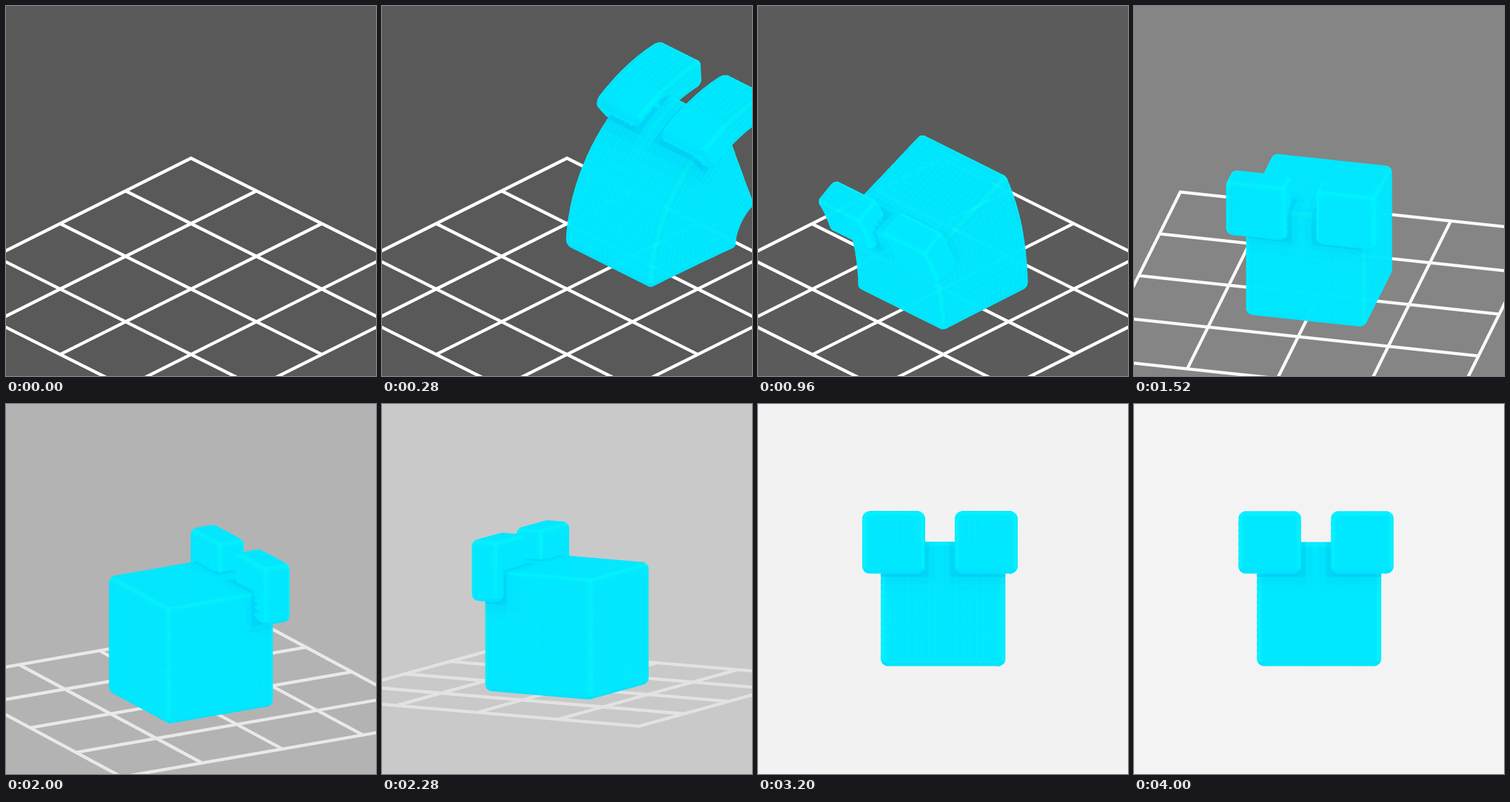
Animation, 540 px wide and 540 px high, one loop 4200 ms. Source, as an HTML page with a canvas:

```html
<!DOCTYPE html>
<html lang="en">
<head>
<meta charset="utf-8">
<title>Cube character turntable</title>
<style>
  html, body { margin: 0; height: 100%; overflow: hidden; background: #595959; }
  canvas { display: block; }
</style>
</head>
<body>
<canvas width="540" height="540"></canvas>
<script>
const ctx = document.querySelector('canvas').getContext('2d');
const LOOP = 4200, CELL = 135, BODY = 180, RADIUS = 10;

// Axes: lateral, forward (where the eyes look), up.
const body = { center: [0, 0, 90], half: [90, 90, 90] };
const eyes = [-72, 63].map(x => ({ center: [x, 80, 180], half: [45, 22.5, 45] }));

const clamp = (v, lo, hi) => Math.min(hi, Math.max(lo, v));
const mix = (a, b, k) => a + (b - a) * k;
const progress = (t, from, to) => clamp((t - from) / (to - from), 0, 1);
const sineInOut = u => (1 - Math.cos(Math.PI * u)) / 2;
const cubicInOut = u => u < .5 ? 4 * u ** 3 : 1 - 4 * (1 - u) ** 3;

// Grid positions along one side, denser inside the rounded edges.
function ticks(half) {
  const flat = half - RADIUS, steps = Math.round(flat / 5);
  const edge = [1, .7, .45, .2].map(k => flat + k * RADIUS);
  const inner = Array.from({ length: steps + 1 }, (_, i) => mix(-flat, flat, i / steps));
  return [...edge.map(v => -v), ...inner, ...edge.reverse()];
}

function roundPoint(p, { center, half }) {
  const core = p.map((v, i) => clamp(v, RADIUS - half[i], half[i] - RADIUS));
  const d = p.map((v, i) => v - core[i]), len = Math.hypot(...d);
  const normal = d.map(v => v / len);
  return { normal, pos: core.map((v, i) => center[i] + v + normal[i] * RADIUS) };
}

const boxDistance = (p, { center, half }) =>
  Math.hypot(...p.map((v, i) => Math.max(Math.abs(v - center[i]) - half[i], 0)));

function surfaceColor({ pos, normal }, occluders) {
  const bevel = 1 - Math.max(...normal.map(Math.abs));
  const near = Math.min(...occluders.map(box => boxDistance(pos, box)));
  const shade = 24 * Math.exp(-near / 9);
  const green = 232 + bevel * (normal[2] < -.3 ? -25 : 40) - shade;
  return `rgb(0,${Math.round(green)},${Math.round(255 - shade * .4)})`;
}

function roundedBox(box, occluders) {
  const quads = [];
  for (let a = 0; a < 3; a++) for (const side of [-1, 1]) {
    const u = (a + 1) % 3, v = (a + 2) % 3;
    const us = ticks(box.half[u]), vs = ticks(box.half[v]);
    const at = (x, y) => {
      const p = [];
      p[a] = side * box.half[a]; p[u] = x; p[v] = y;
      return roundPoint(p, box);
    };
    for (let i = 1; i < us.length; i++) for (let j = 1; j < vs.length; j++) {
      const [x0, x1, y0, y1] = [us[i - 1], us[i], vs[j - 1], vs[j]];
      const points = [at(x0, y0), at(x1, y0), at(x1, y1), at(x0, y1)].map(c => c.pos);
      if (side < 0) points.reverse();
      quads.push({ points, color: surfaceColor(at((x0 + x1) / 2, (y0 + y1) / 2), occluders) });
    }
  }
  return quads;
}

const quads = [...roundedBox(body, eyes), ...eyes.flatMap(eye => roundedBox(eye, []))];

// Total bend angle of the body; negative leans backwards.
function leanAt(t) {
  if (t < 1000) return mix(-1.22, .45, sineInOut(progress(t, 360, 1000)));
  return mix(.45, 0, sineInOut(progress(t, 1000, 1440)));
}

function bend([l, f, z], lean) {
  if (Math.abs(lean) < 1e-4) return [l, f, z];
  const r = BODY / lean, a = z / r;
  return [l, r - (r - f) * Math.cos(a), (r - f) * Math.sin(a)];
}

function cameraAt(turn) {
  const yaw = mix(45, -360, turn) * Math.PI / 180;
  const tilt = 30 * (1 - turn), el = tilt * Math.PI / 180;
  const groundY = 382 + tilt * (4.05 - .027 * tilt - .00245 * tilt ** 2);
  const [c, s, ce, se] = [Math.cos(yaw), Math.sin(yaw), Math.cos(el), Math.sin(el)];
  return ([l, f, z]) => {
    const toward = l * s + f * c;
    return [270 + l * c - f * s, groundY + toward * se - z * ce, toward * ce + z * se];
  };
}

function backgroundAt(t) {
  const light = mix(.1, .896, sineInOut(progress(t, 840, 3360)));
  const v = Math.round(255 * (1.055 * light ** (1 / 2.4) - .055));
  return `rgb(${v},${v},${v})`;
}

function drawGrid(project, alpha) {
  const end = 2 * CELL;
  ctx.beginPath();
  for (let k = -end; k <= end; k += CELL) {
    for (const [from, to] of [[[k, -end, 0], [k, end, 0]], [[-end, k, 0], [end, k, 0]]]) {
      ctx.moveTo(...project(from).slice(0, 2));
      ctx.lineTo(...project(to).slice(0, 2));
    }
  }
  ctx.globalAlpha = alpha;
  ctx.strokeStyle = '#fff';
  ctx.lineWidth = 4.6;
  ctx.lineCap = 'round';
  ctx.stroke();
  ctx.globalAlpha = 1;
}

function drawCharacter(project, lean, slide) {
  const visible = [];
  for (const { points, color } of quads) {
    const q = points.map(p => {
      const [l, f, z] = bend(p, lean);
      return project([l, f - slide, z]);
    });
    const [a, b, c, d] = q;
    const area = (c[0] - a[0]) * (d[1] - b[1]) - (c[1] - a[1]) * (d[0] - b[0]);
    if (area > 0) visible.push({ q, color, depth: a[2] + b[2] + c[2] + d[2] });
  }
  visible.sort((m, n) => m.depth - n.depth);
  ctx.lineWidth = .6;
  ctx.lineJoin = 'round';
  for (const { q, color } of visible) {
    ctx.fillStyle = ctx.strokeStyle = color;
    ctx.beginPath();
    for (const [x, y] of q) ctx.lineTo(x, y);
    ctx.closePath();
    ctx.fill();
    ctx.stroke();
  }
}

function draw(t) {
  const turn = cubicInOut(progress(t, 860, 3305));
  const project = cameraAt(turn);
  const slide = 4.5 * CELL * (1 - progress(t, 0, 820)) ** 3;
  ctx.fillStyle = backgroundAt(t);
  ctx.fillRect(0, 0, 540, 540);
  drawGrid(project, (1 - turn) ** .65);
  drawCharacter(project, leanAt(t), slide);
}

const start = performance.now();
function frame() {
  draw((performance.now() - start) % LOOP);
  requestAnimationFrame(frame);
}
frame();
</script>
</body>
</html>
```
